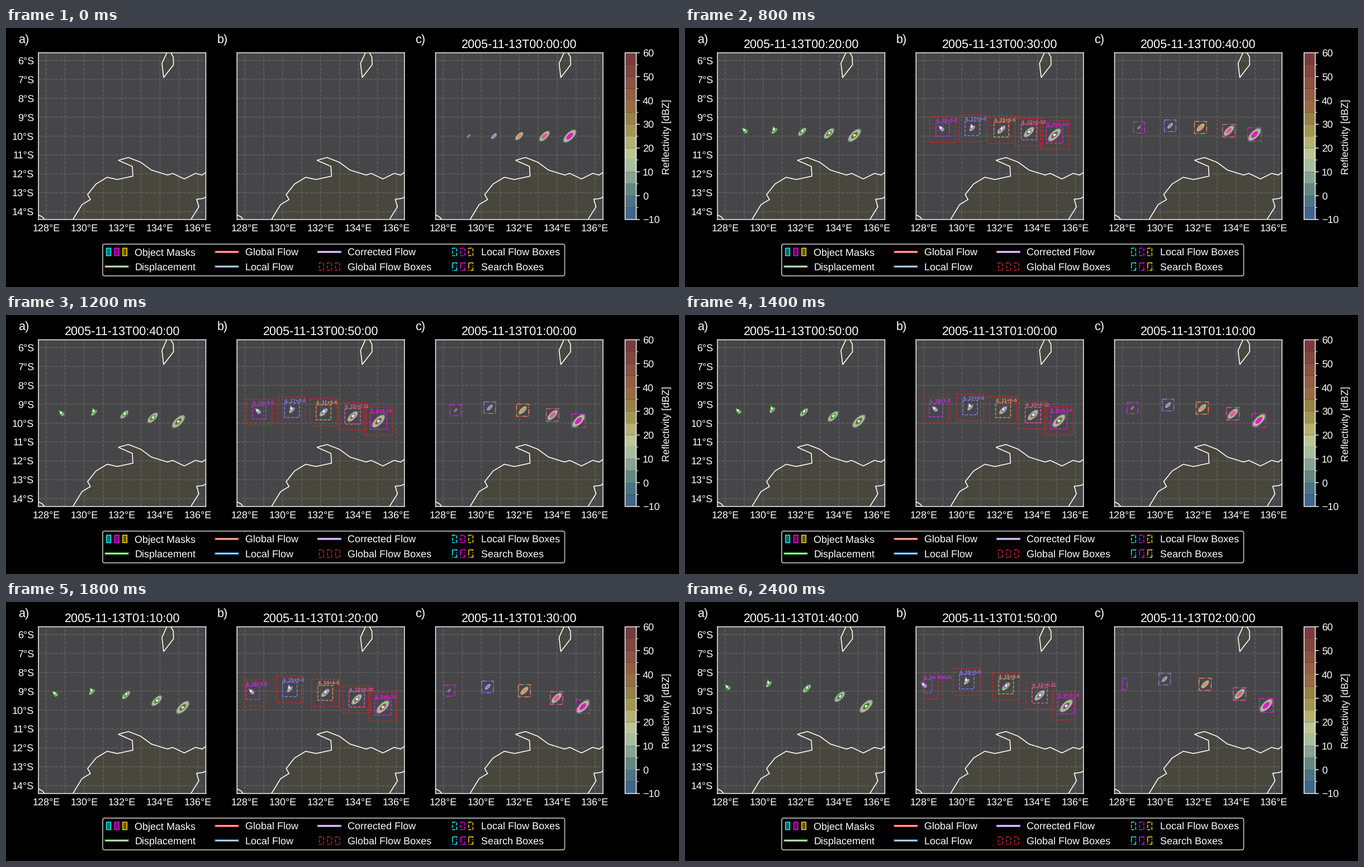
A matplotlib script for the animation above (2600 ms loop, 1204 px wide and 465 px high).

```python
import math

import matplotlib.pyplot as plt
from matplotlib.animation import FuncAnimation
from matplotlib.patches import Ellipse, FancyBboxPatch, Polygon, Rectangle

W, H, DPI = 1204, 465, 128
PT = 72 / DPI                      # points per pixel
THIN = 1.44 * PT
plt.rcParams.update({"font.family": "Liberation Sans", "text.color": "white",
                     "text.hinting": "none", "path.snap": False})

# Panels share one local pixel space
LEFT, RIGHT, TOP, BOTTOM = 58, 357.5, 44.5, 343.8
PANEL_X = (58, 413.3, 768.5)
DEG = 33.9

STEPS, STEP_MS = 13, 200
ANGLES = (135, 105, 75, 45, 15)
SPEEDS = (5.5, 4.8, 4.0, 3.4, 2.7)
SIZES = (4.0, 6.8, 9.7, 12.5, 15.5)
COLORS = ("#c030e6", "#8c78f2", "#f58a58", "#f2569e", "#f012e4")
SEARCH = (10, 10.4, 10.9, 11.3, 12.2)
LOCAL = (12, 13, 13.3, 13.8, 14.6)
GLOBAL = (23, 24, 24.4, 24.5, 25.4)
RED, GREEN, PURPLE, BLUE = "#c8282a", "#2ca02c", "#9467bd", "#1f77b4"

NOTES = (
    ("4, 20+3-0", "4, 17+7-0", "4, 14+0-5", "4, 12+3-10", "5, 9+0-14"),
    ("4, 18+0-0", "4, 17+0-0", "4, 15+6-5", "4, 12+6-10", "5, 9+0-14"),
    ("4, 18+3-0", "4, 17+0-0", "4, 11+6-6", "4, 10+0-11", "5, 8+6-14"),
    ("4, 18+3-0", "4, 15+0-0", "4, 14+4-5", "4, 12+0-10", "5, 9+0-14"),
    ("4, 19+6-0", "4, 15+7-0", "4, 14+3-5", "4, 12+6-11", "5, 9+6-14"),
    ("4, 18+3-0", "4, 15+0-0", "4, 15+6-5", "4, 12+6-11", "5, 9+3-14"),
)

DBZ = ("#42658c", "#4a7485", "#628783", "#86a394", "#a9bd9f", "#bbc795",
       "#b3b274", "#a19651", "#97804a", "#966c45", "#935e46", "#8c5244",
       "#82453f", "#793a3f")
RINGS = ((1, DBZ[2]), (.92, DBZ[3]), (.82, DBZ[4]), (.71, DBZ[5]),
         (.61, DBZ[6]), (.52, DBZ[8]), (.44, DBZ[10]), (.36, DBZ[12]))

COAST = ((119, 345), (136, 317), (151, 308), (146, 299), (161, 280),
         (181, 268), (199, 272), (227, 266), (226, 248.5), (201, 237.5),
         (219, 232.5), (241, 241), (260, 255), (289, 264), (298, 261),
         (319, 271), (339, 261), (351, 264), (359, 258), (370, 258),
         (370, 303), (358, 303), (353, 306), (341, 307.5), (345, 321),
         (330, 345), (330, 360), (119, 360))
CORNER = ((50, 332), (58, 335.5), (65, 339), (70, 345), (70, 360), (50, 360))
ISLAND = ((288, 40), (287, 46), (279, 63.5), (282, 89), (299.7, 66),
          (299.3, 52), (294, 43))


def lon_x(lon):
    return 72 + DEG * (lon - 128)


def lat_y(lat):
    return 58.5 + DEG * (lat - 6)


def write(ax, x, y, s, px=18, **kw):
    return ax.text(x, y, s, fontsize=px * PT, va="baseline", **kw)


def stamp(step):
    return f"2005-11-13T{step // 6:02d}:{step % 6 * 10:02d}:00"


def heading(i):
    a = math.radians(ANGLES[i])
    return math.cos(a), -math.sin(a)


def center(i, t):
    ux, uy = heading(i)
    x0 = lon_x(128 + (i + 1) * 4 / 3)
    return x0 + ux * SPEEDS[i] * t, lat_y(10) + uy * SPEEDS[i] * t


fig = plt.figure(figsize=(W / DPI, H / DPI), dpi=DPI, facecolor="black")
page = fig.add_axes([0, 0, 1, 1])
page.set(xlim=(0, W), ylim=(H, 0))
page.axis("off")


def make_panel(x, name):
    ax = fig.add_axes([x / W, 1 - BOTTOM / H, (RIGHT - LEFT) / W,
                       (BOTTOM - TOP) / H], facecolor="#464648")
    ax.set(xlim=(LEFT, RIGHT), ylim=(BOTTOM, TOP), xticks=[], yticks=[])
    for spine in ax.spines.values():
        spine.set(color="white", linewidth=THIN, zorder=20)
    for land in (COAST, CORNER, ISLAND):
        ax.add_patch(Polygon(land, fc="#47473d", ec="none", zorder=1))
        ax.add_patch(Polygon(land, fc="none", ec="white", lw=1.6 * PT, zorder=3))
    grid = dict(color="#626264", lw=THIN, ls="--", zorder=2)
    for i in range(9):
        ax.axvline(lon_x(128 + i), **grid)
        ax.axhline(lat_y(6 + i), **grid)
    for lon in range(128, 137, 2):
        write(page, x - LEFT + lon_x(lon), 365, f"{lon}°E", ha="center")
    write(page, x - 36, 27, name, 21.6)
    title = write(page, x + 149.7, 36, "", 21.6, ha="center")
    return ax, title


def draw_colorbar():
    x0, x1 = 1107.5, 1127.5
    h = (BOTTOM - TOP) / len(DBZ)
    for i, color in enumerate(DBZ):
        page.add_patch(Rectangle((x0, BOTTOM - (i + 1) * h), x1 - x0, h,
                                 fc=color, ec="none", snap=True))
    page.add_patch(Rectangle((x0, TOP), x1 - x0, BOTTOM - TOP, fc="none",
                             ec="white", lw=THIN))
    for i in range(len(DBZ) + 1):
        y = BOTTOM - i * h
        major = i % 2 == 0
        page.plot([x1, x1 + (6.3 if major else 3.6)], [y, y], color="white",
                  lw=(1.44 if major else 1.08) * PT, solid_capstyle="butt")
        if major:
            write(page, 1139, y + 6.5, str(i * 5 - 10).replace("-", "\u2212"))
    page.text(1182, 195.5, "Reflectivity [dBZ]", fontsize=18 * PT,
              rotation=90, ha="center", va="center")


def key_line(x, y, color):
    for width, c in ((4.3, color), (1.5, "white")):
        page.plot([x, x + 39], [y, y], color=c, lw=width * PT,
                  solid_capstyle="projecting")


def key_boxes(x, y, edges, ls="-", fill=False):
    for i, edge in enumerate(edges):
        box = (x + 14.5 * i, y - 6.7), 7.6, 13.4
        if fill:
            page.add_patch(Rectangle(*box, fc=edge, alpha=.4, ec="none"))
        page.add_patch(Rectangle(*box, fc="none", ec=edge, lw=1.5 * PT, ls=ls))


def draw_legend():
    page.add_patch(FancyBboxPatch(
        (176.5, 391.5), 819.5, 50, boxstyle="round,pad=3.5,rounding_size=3.5",
        fc="black", ec="#b4b4b4", lw=1.8 * PT))
    trio = ("cyan", "magenta", "gold")
    y1, y2 = 402, 428.3
    key_boxes(179.8, y1, trio, fill=True)
    key_line(178.5, y2, GREEN)
    key_line(375.5, y1, "#d62728")
    key_line(375.5, y2, BLUE)
    key_line(559, y1, PURPLE)
    key_boxes(560.5, y2, (RED,) * 3, "--")
    key_boxes(798.7, y1, trio, "--")
    key_boxes(798.7, y2, trio, "-.")
    columns = ((230.5, "Object Masks", "Displacement"),
               (427.5, "Global Flow", "Local Flow"),
               (611, "Corrected Flow", "Global Flow Boxes"),
               (849.5, "Local Flow Boxes", "Search Boxes"))
    for x, upper, lower in columns:
        write(page, x, y1 + 6.3, upper)
        write(page, x, y2 + 6.3, lower)


panels = [make_panel(x, n) for x, n in zip(PANEL_X, ("a)", "b)", "c)"))]
for lat in range(6, 15):
    write(page, 50, lat_y(lat) + 6.3, f"{lat}°S", ha="right")
draw_colorbar()
draw_legend()

live = []


def add(ax, patch):
    live.append(ax.add_patch(patch))


def draw_cell(ax, i, t, mask=False):
    c, a = center(i, t), SIZES[i]
    # weaker cells reach fewer reflectivity levels
    for r, color in RINGS[:4 + i]:
        add(ax, Ellipse(c, 2 * a * r, .88 * a * r, angle=-45, fc=color,
                        ec="none", zorder=5))
    if mask:
        core = .42 * a + 1.2
        add(ax, Ellipse(c, 2 * core, .95 * core, angle=-45, fc=COLORS[i],
                        ec="none", alpha=.9, zorder=6))


def draw_arrow(ax, i, t, color):
    (x, y), (ux, uy) = center(i, t), heading(i)
    tip = 1.8 * SPEEDS[i]
    base = max(tip - 7.4, -2.5)
    shape = ((-2.5, -1.1), (base, -1.1), (base, -3.7), (tip, 0),
             (base, 3.7), (base, 1.1), (-2.5, 1.1))
    points = [(x + s * ux - n * uy, y + s * uy + n * ux) for s, n in shape]
    add(ax, Polygon(points, fc="white", ec=color, lw=1.3 * PT, zorder=9))


def draw_box(ax, i, t, half, color, ls, z):
    x, y = center(i, t)
    x0 = max(x - half, lon_x(128))
    x1 = min(x + half, lon_x(136))
    add(ax, Rectangle((x0, y - half), x1 - x0, 2 * half, fc="none", ec=color,
                      lw=THIN, ls=ls, zorder=z))
    return x0, y - half


def in_domain(i, t):
    return center(i, t)[0] >= lon_x(128)


def update(k):
    for artist in live:
        artist.remove()
    live.clear()
    (ax_a, _), (ax_b, _), (ax_c, _) = panels
    for lag, (_, title) in zip((2, 1, 0), panels):
        title.set_text(stamp(k - lag) if k >= lag else "")
    for i in range(5):
        if k >= 2:
            draw_cell(ax_a, i, k - 2)
            draw_arrow(ax_a, i, k - 2, GREEN)
        if k >= 1:
            t = k - 1
            draw_cell(ax_b, i, t)
            draw_arrow(ax_b, i, t, PURPLE)
            draw_box(ax_b, i, t, GLOBAL[i], RED, "--", 7)
            x, y = draw_box(ax_b, i, t, LOCAL[i], COLORS[i], "--", 8)
            note = NOTES[max(t - 1, 0) // 2][i]
            if not in_domain(i, k):
                note = "4, No Match"
            live.append(write(ax_b, x, y - 1.8, note, 9, color=COLORS[i],
                              weight="bold", zorder=10))
            draw_box(ax_c, i, k, SEARCH[i], COLORS[i], "-.", 8)
        if in_domain(i, k):
            draw_cell(ax_c, i, k, mask=True)
    return live


anim = FuncAnimation(fig, update, frames=STEPS, interval=STEP_MS,
                     init_func=lambda: [], repeat=True, repeat_delay=0)
plt.show()
```
